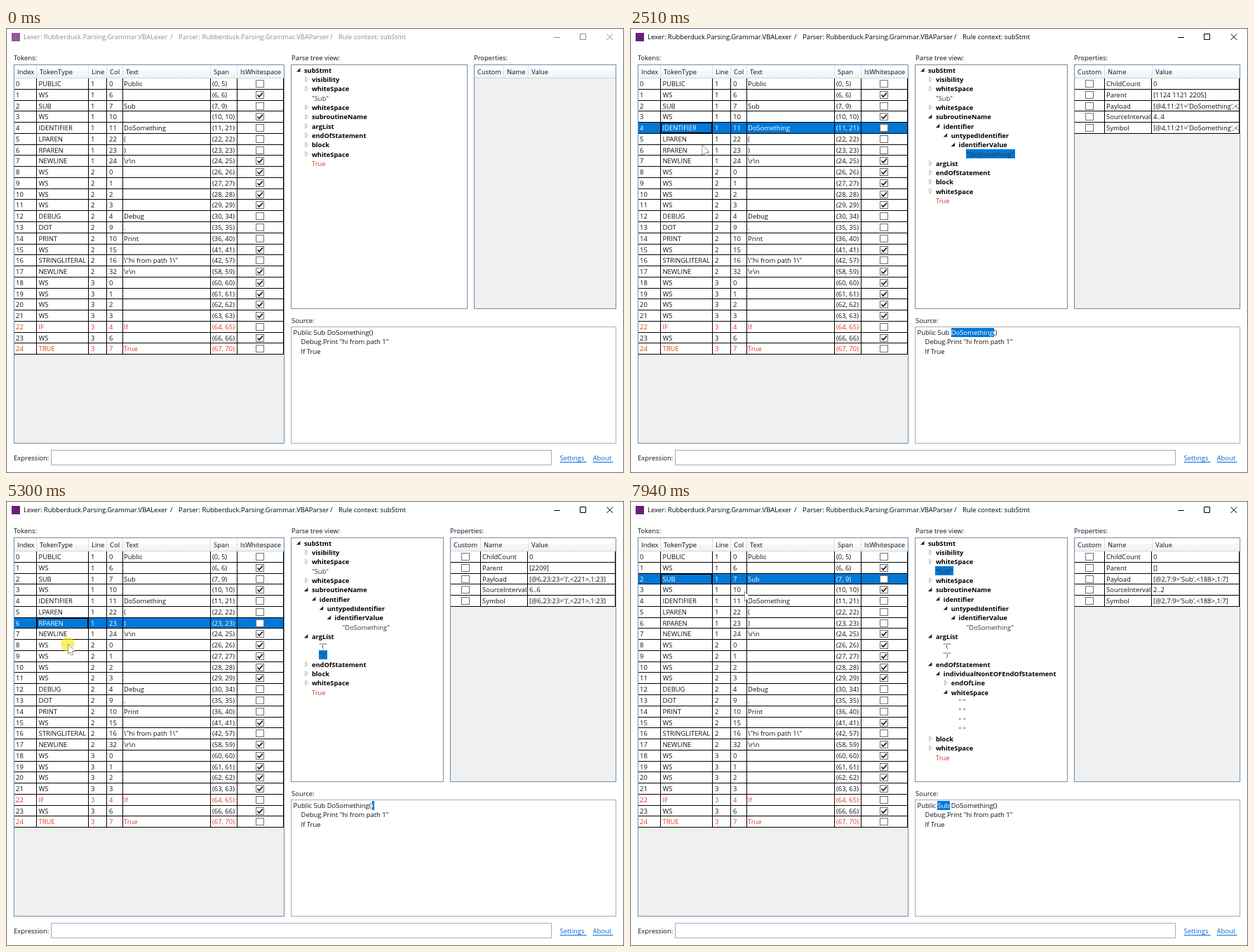
Write an HTML page with a canvas that moves like this. It is 881x635 px and loops after 8000 ms.

```html
<!DOCTYPE html>
<html lang="en">
<head>
<meta charset="utf-8">
<title>Token viewer</title>
<style>
  html, body { margin: 0; width: 100%; height: 100%; overflow: hidden; background: #fff; }
  canvas { display: block; }
</style>
</head>
<body>
<canvas id="stage" width="881" height="635"></canvas>
<script>
const ctx = document.getElementById('stage').getContext('2d');
const LOOP = 8000, ROW = 15.77, ROWS_TOP = 72;
const FONT = '9.45px "Open Sans", sans-serif', BOLD = 'bold 9.3px "Open Sans", sans-serif';
const BLUE = '#0078d7', RED = '#dc3a1c', GRID_BORDER = '#688caf';

// The token grid is produced by lexing the code itself.
const code = 'Public Sub DoSomething()\r\n    Debug.Print "hi from path 1"\r\n    If True';
const typeNames = { ' ': 'WS', '(': 'LPAREN', ')': 'RPAREN', '.': 'DOT', '\r\n': 'NEWLINE', DoSomething: 'IDENTIFIER' };
let line = 1, lineStart = 0;
const tokens = [...code.matchAll(/\r\n|"[^"]*"|\w+|./g)].map(({ 0: text, index: start }) => {
  const token = {
    text, start, line, col: start - lineStart, end: start + text.length - 1, blank: !text.trim(),
    type: typeNames[text] || (text[0] === '"' ? 'STRINGLITERAL' : text.toUpperCase()),
    shown: text.replace('\r\n', '\\r\\n').replace(/"/g, '\\"').trim(),
    error: text === 'If' || text === 'True'
  };
  if (text === '\r\n') { line++; lineStart = token.end + 1; }
  return token;
});

// Tree nodes: depth, label, stage at which it opens (none for leaves), stage at which it appears.
const NEVER = 9;
const nodes = [
  [0, 'subStmt', 0], [1, 'visibility', NEVER], [1, 'whiteSpace', NEVER], [1, '"Sub"'], [1, 'whiteSpace', NEVER],
  [1, 'subroutineName', 1], [2, 'identifier', 1, 1], [3, 'untypedIdentifier', 1, 1],
  [4, 'identifierValue', 1, 1], [5, '"DoSomething"', null, 1],
  [1, 'argList', 2], [2, '"("', null, 2], [2, '")"', null, 2],
  [1, 'endOfStatement', 3], [2, 'individualNonEOFEndOfStatement', 3, 3],
  [3, 'endOfLine', NEVER, 3], [3, 'whiteSpace', 3, 3],
  ...Array.from({ length: 4 }, () => [4, '" "', null, 3]),
  [1, 'block', NEVER], [1, 'whiteSpace', NEVER], [1, 'True']
];

// mark: x, width and line of the highlighted code
const selections = [
  { at: 1860, row: 4, stage: 1, parent: '[1124 1121 2205]', kind: 238, mark: [458, 61, 0] },
  { at: 3100, row: 5, stage: 2, parent: '[2209]', kind: 214, mark: [518.5, 3.5, 0] },
  { at: 4300, row: 6, stage: 2, parent: '[2209]', kind: 221, mark: [521.5, 3.5, 0] },
  { at: 5360, row: 8, stage: 3, parent: '[3088 3076 2212]', kind: 235, mark: [409, 3, 1] },
  { at: 7200, row: 2, stage: 3, parent: '[]', kind: 188, mark: [438, 18, 0] }
];
const clicks = [[1780, 1980], [3100, 3240], [4240, 4370], [5300, 5500], [7140, 7340]];

// Pointer moves: begin, end, steps, end point, optional curve control point
const moves = [
  [520, 1320, 13, 124, 140],
  [1380, 1720, 6, 113, 142],
  [2440, 2960, 9, 87, 154, 100, 190],
  [3500, 3970, 8, 91, 180],
  [4770, 5030, 5, 88, 204],
  [6020, 6550, 9, 78, 130, 97, 167],
  [6750, 6950, 4, 76, 115],
  [7740, 7940, 4, 163, 129]
];

function pointerAt(t) {
  let x = 859, y = 594;
  for (const [from, to, steps, tx, ty, cx = (x + tx) / 2, cy = (y + ty) / 2] of moves) {
    if (t < from) break;
    const k = Math.min(steps - 1, Math.floor((t - from) / (to - from) * (steps - 1)));
    const linear = from === 520 ? k / (steps - 1) : (k + 1) / steps;
    const p = linear * (2 - linear), q = 1 - p;
    x = q * q * x + 2 * p * q * cx + p * p * tx;
    y = q * q * y + 2 * p * q * cy + p * p * ty;
  }
  return [x, y];
}

function fill(x, y, w, h, color) { ctx.fillStyle = color; ctx.fillRect(x, y, w, h); }
function box(x, y, w, h, border, background) {
  fill(x, y, w, h, border);
  fill(x + 1, y + 1, w - 2, h - 2, background);
}
function text(value, x, centerY, color = '#111', font = FONT) {
  ctx.font = font;
  ctx.fillStyle = color;
  ctx.fillText(value, x, Math.round(centerY + 3.3));
}
function path(points, color, width = 1, close = false) {
  ctx.beginPath();
  points.forEach(([x, y]) => ctx.lineTo(x, y));
  if (close) ctx.closePath();
  ctx.strokeStyle = color;
  ctx.lineWidth = width;
  ctx.stroke();
}
const rowTop = i => Math.round(ROWS_TOP + ROW * i);

function checkbox(x, y, checked) {
  box(x - 6, y - 6, 12, 11, '#707070', '#fff');
  if (checked) path([[x - 3.5, y - .5], [x - 1, y + 2], [x + 4, y - 3.5]], '#111', 1.6);
}

function gridHeader(x, right, labels, separators) {
  const shade = ctx.createLinearGradient(0, 53, 0, 72);
  shade.addColorStop(0, '#fff');
  shade.addColorStop(.4, '#fff');
  shade.addColorStop(.45, '#f7f8fa');
  shade.addColorStop(1, '#f1f2f4');
  fill(x + 1, 53, right - x - 2, 19, shade);
  fill(x + 1, 71, right - x - 2, 1, '#d5d5d5');
  separators.forEach(s => fill(s, 53, 1, 18, '#dcdfe3'));
  labels.forEach(([label, lx]) => text(label, lx, 63));
}

function gridLines(x, right, count, separators) {
  for (let i = 1; i <= count; i++) fill(x + 1, rowTop(i) - 1, right - x - 1, 1, '#000');
  separators.forEach(s => fill(s, ROWS_TOP, 1, rowTop(count) - ROWS_TOP, '#000'));
}

function drawTitle(active) {
  const color = active ? '#000' : '#8c8c8c';
  fill(8, 7, 12, 12, active ? '#68217a' : '#8d5b9a');
  text('Lexer: Rubberduck.Parsing.Grammar.VBALexer', 25, 13, color);
  text('/', 234, 13, color);
  text('Parser: Rubberduck.Parsing.Grammar.VBAParser', 246, 13, color);
  text('/', 462, 13, color);
  text('Rule context: subStmt', 474, 13, color);
  path([[781, 13.5], [790, 13.5]], color);
  path([[818.5, 8.5], [826.5, 8.5], [826.5, 16.5], [818.5, 16.5]], color, 1, true);
  path([[856.5, 8.5], [865, 17]], color);
  path([[865, 8.5], [856.5, 17]], color);
}

function drawTokens(selected) {
  const separators = [43, 117, 143, 166, 291, 329];
  text('Tokens:', 11, 43);
  box(11, 52, 386, 541, GRID_BORDER, '#f0f0f0');
  gridHeader(11, 397, [['Index', 16], ['TokenType', 48], ['Line', 122], ['Col', 148],
    ['Text', 171], ['Span', 296], ['IsWhitespace', 334]], separators);
  tokens.forEach((token, i) => {
    const top = rowTop(i), y = top + 8, current = i === selected;
    const color = current ? '#fff' : token.error ? RED : '#111';
    fill(12, top, 384, rowTop(i + 1) - top, current ? BLUE : '#fff');
    text(i, 14, y, color);
    text(token.type, 46.5, y, color);
    text(token.line, 121, y, color);
    text(token.col, 147, y, color);
    text(token.shown, 168, y, color);
    text(`(${token.start}, ${token.end})`, 294, y, color);
    checkbox(362, y, token.blank);
  });
  gridLines(11, 396, tokens.length, [...separators, 395]);
  if (selected >= 0) {
    const top = rowTop(selected);
    path([[44.5, top + .5], [116.5, top + .5], [116.5, top + 14.5], [44.5, top + 14.5]], '#000', 1, true);
  }
}

function drawTree(selection, right) {
  const stage = selection ? selection.stage : 0;
  const visible = nodes.filter(([, , , shows = 0]) => stage >= shows);
  const wanted = selection ? `"${tokens[selection.row].text}"` : null;
  const picked = visible.findIndex(node => node[1] === wanted);
  text('Parse tree view:', 407, 43);
  box(406, 52, right - 406, 349, '#828790', '#fff');
  visible.forEach(([depth, label, opens], i) => {
    const x = 425 + depth * 10.9, y = 60.5 + i * 13.3, leaf = opens == null;
    if (i === picked) {
      ctx.font = FONT;
      fill(Math.round(x - 1), Math.round(y - 7), Math.round(ctx.measureText(label).width + 2), 13, BLUE);
    }
    text(label, x, y, label === 'True' ? RED : leaf ? '#303a42' : '#000', leaf ? FONT : BOLD);
    if (leaf) return;
    if (stage >= opens) {
      ctx.fillStyle = '#222';
      ctx.beginPath();
      ctx.moveTo(x - 5.5, y - 3.5);
      ctx.lineTo(x - 5.5, y + 2);
      ctx.lineTo(x - 11, y + 2);
      ctx.fill();
    } else {
      path([[x - 9, y - 4], [x - 5.5, y - .5], [x - 9, y + 3]], '#a5a5a5', .9, true);
    }
  });
}

function drawProperties(selection) {
  const x = selection ? 633 : 667, nameX = selection ? 676 : 709;
  text('Properties:', x, 43);
  box(x, 52, 870 - x, 349, GRID_BORDER, '#f0f0f0');
  gridHeader(x, 870, [['Custom', x + 5], ['Name', nameX + 5], ['Value', 749]], [nameX, 744]);
  if (!selection) return;
  const { row, parent, kind } = selection, { start, end, text: content, line, col } = tokens[row];
  const symbol = `[@${row},${start}:${end}='${content}',<${kind}>,${line}:${col}]`;
  const rows = [['ChildCount', 0], ['Parent', parent], ['Payload', symbol],
    ['SourceInterval', `${row}..${row}`], ['Symbol', symbol]];
  ctx.save();
  ctx.beginPath();
  ctx.rect(x + 1, 53, 868 - x, 347);
  ctx.clip();
  rows.forEach(([name, value], i) => {
    const top = rowTop(i), y = top + 8;
    fill(x + 1, top, 868 - x, rowTop(i + 1) - top, '#fff');
    checkbox(655, y, false);
    text(name, 679, y);
    text(value, 746, y);
  });
  gridLines(x, 869, rows.length, [nameX, 743, 868]);
  ctx.restore();
}

function codeLines(color) {
  code.split('\r\n').forEach((s, i) => text(s.trim(), i ? 420.5 : 409.5, 434.7 + i * 13.3, color));
}

function drawCode(selection) {
  text('Source:', 407, 418);
  box(406, 426, 464, 167, '#abadb3', '#fff');
  codeLines('#111');
  if (!selection) return;
  const [x, width, row] = selection.mark, y = 428 + row * 13;
  ctx.save();
  ctx.beginPath();
  ctx.rect(x, y, width, 13);
  ctx.clip();
  fill(x, y, width, 13, BLUE);
  codeLines('#fff');
  ctx.restore();
}

function drawFooter() {
  text('Expression:', 11, 614);
  box(64, 602, 714, 22, '#abadb3', '#fff');
  for (const [label, x, width] of [['Settings', 789.5, 38], ['About', 836.5, 29]]) {
    text(label, x, 614, '#0066cc');
    fill(x, 619, width, 1, '#0066cc');
  }
}

function drawPointer(t) {
  const [x, y] = pointerAt(t);
  if (clicks.some(([from, to]) => t >= from && t < to)) {
    ctx.fillStyle = 'rgba(250, 232, 0, .6)';
    ctx.beginPath();
    ctx.arc(x, y + .5, 10, 0, Math.PI * 2);
    ctx.fill();
  }
  const arrow = [[0, 0], [0, 13.5], [3.1, 10.6], [5.2, 15.5], [7.4, 14.5], [5.3, 9.8], [9.7, 9.6]];
  ctx.fillStyle = '#fff';
  path(arrow.map(([dx, dy]) => [x + .5 + dx, y + .5 + dy]), '#222', 1, true);
  ctx.fill();
}

function render(t) {
  const selection = selections.filter(s => t >= s.at).pop();
  box(0, 0, 881, 635, '#6e6e6e', '#fff');
  drawTitle(t >= 1780);
  drawTokens(selection ? selection.row : -1);
  drawTree(selection, selection ? 624 : 658);
  drawProperties(selection);
  drawCode(selection);
  drawFooter();
  if (t >= 520) drawPointer(t);
}

const began = performance.now();
function tick() {
  render((performance.now() - began) % LOOP);
  requestAnimationFrame(tick);
}
tick();
</script>
</body>
</html>
```
